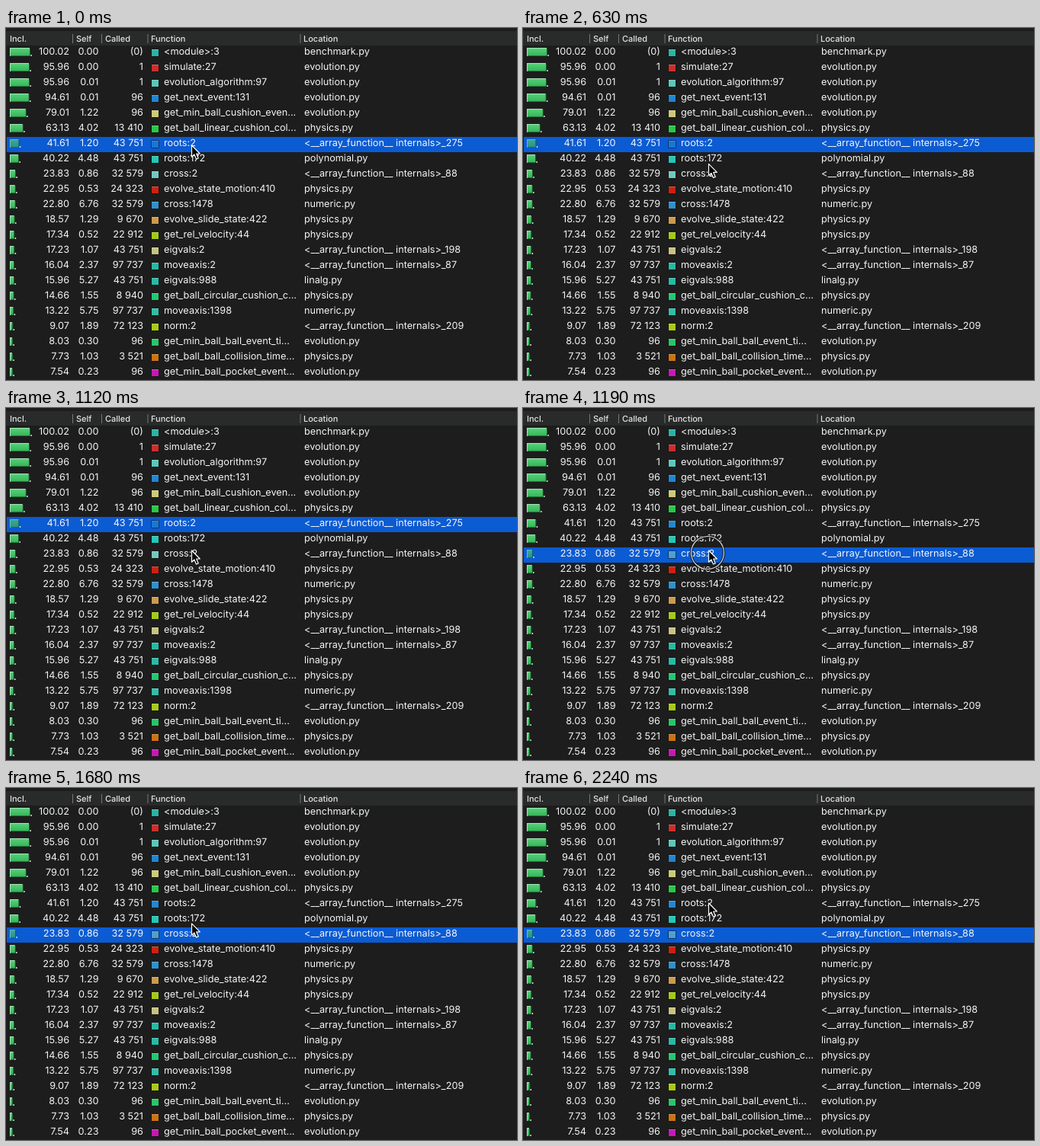
An HTML page for the animation above (2.45 s loop, 670 px wide and 462 px high).

```html
<!DOCTYPE html>
<html lang="en">
<head>
<meta charset="utf-8">
<title>Profiler call list</title>
<style>
  html, body { margin: 0; width: 100%; height: 100%; overflow: hidden; background: #1d1d1d; }
  svg { display: block; width: 670px; height: 462px; }
  text { font: 12.7px Inter, "Open Sans", sans-serif; fill: #f4f4f4; text-rendering: geometricPrecision; }
  .head { font-size: 11px; font-weight: 500; fill: #e4e4e4; }
  .num { text-anchor: end; }
  .tint { fill: #0b5bd3; opacity: 0; }
  .selected .back { fill: #0b5bd3; }
  .selected .tint { opacity: .35; }
</style>
</head>
<body>
<svg id="stage" viewBox="0 0 670 462">
  <defs>
    <linearGradient id="green" x2="0" y2="1">
      <stop offset="0" stop-color="#55cf78"/>
      <stop offset="1" stop-color="#35b358"/>
    </linearGradient>
  </defs>
  <rect width="670" height="462" fill="#1d1d1d"/>
  <rect y="4" width="670" height="19" fill="#292a2a"/>
  <g id="header"></g>
  <g id="rows"></g>
  <g id="ring" fill="none">
    <circle cx="242" cy="190" r="21.5" stroke="#111" stroke-opacity=".75" stroke-width="3.4"/>
    <circle cx="242" cy="190" r="21.5" stroke="#d8d8d8" stroke-width="1.2"/>
  </g>
  <path id="cursor" d="M0 0V15.2L3.4 12L6 18L8.7 16.9L6.2 11H10.8Z"
        fill="#000" stroke="#fff" stroke-width="1.2" stroke-linejoin="round"/>
</svg>
<script>
const LOOP = 2450, STEP = 70, CLICK = 1190, RELEASE = 1330;
const FIRST_PICK = 6, SECOND_PICK = 8;

// inclusive | self | calls | function | location | swatch
const calls = `100.02|0.00|(0)|<module>:3|benchmark.py|#2bb3a4
95.96|0.00|1|simulate:27|evolution.py|#cf2c2c
95.96|0.01|1|evolution_algorithm:97|evolution.py|#5ac8bb
94.61|0.01|96|get_next_event:131|evolution.py|#2085d2
79.01|1.22|96|get_min_ball_cushion_even...|evolution.py|#cbca78
63.13|4.02|13 410|get_ball_linear_cushion_col...|physics.py|#28c846
41.61|1.20|43 751|roots:2|<__array_function__ internals>_275|#2387d0
40.22|4.48|43 751|roots:172|polynomial.py|#22c8b7
23.83|0.86|32 579|cross:2|<__array_function__ internals>_88|#74c8bf
22.95|0.53|24 323|evolve_state_motion:410|physics.py|#cf2010
22.80|6.76|32 579|cross:1478|numeric.py|#3090ce
18.57|1.29|9 670|evolve_slide_state:422|physics.py|#cc9a4e
17.34|0.52|22 912|get_rel_velocity:44|physics.py|#a3cb12
17.23|1.07|43 751|eigvals:2|<__array_function__ internals>_198|#c9c281
16.04|2.37|97 737|moveaxis:2|<__array_function__ internals>_87|#28b8a4
15.96|5.27|43 751|eigvals:988|linalg.py|#28b9a6
14.66|1.55|8 940|get_ball_circular_cushion_c...|physics.py|#24c771
13.22|5.75|97 737|moveaxis:1398|numeric.py|#31bda8
9.07|1.89|72 123|norm:2|<__array_function__ internals>_209|#a8ca12
8.03|0.30|96|get_min_ball_ball_event_ti...|evolution.py|#28c668
7.73|1.03|3 521|get_ball_collision_time...|physics.py|#cc7212
7.54|0.23|96|get_min_ball_pocket_event...|evolution.py|#c818b4`
  .replace("get_ball_collision", "get_ball_ball_collision")
  .split("\n").map(line => line.split("|"));

const $ = id => document.getElementById(id);

function add(parent, tag, attrs, label) {
  const node = document.createElementNS("http://www.w3.org/2000/svg", tag);
  for (const key in attrs) node.setAttribute(key, attrs[key]);
  if (label) node.textContent = label;
  return parent.appendChild(node);
}

const box = (parent, x, y, width, height, fill, extra) =>
  add(parent, "rect", { x, y, width, height, fill, ...extra });

[["Incl.", 5], ["Self", 92], ["Called", 130], ["Function", 190], ["Location", 390]]
  .forEach(([label, x], i) => {
    add($("header"), "text", { x, y: 18, class: "head" }, label);
    if (i) box($("header"), x - (i < 3 ? 5 : 4.5), 8, 1, 12, "#777");
  });

function addBar(row, share, mid) {
  const width = Math.max(2, share * .25), top = mid - 5;
  box(row, 5, top, width + 1, 11, "#a5e5b6");
  box(row, 6, top + 1, width, 10, "url(#green)");
  box(row, 6, top + 10, width, 1, "#1c7a37");
  box(row, 6 + width, top + 1, 1, 10, "#17642d");
  box(row, 7.4 + width, top + 9, 1.4, 2, "#d6f0dc");
}

const rows = calls.map(([incl, self, count, name, place, color], i) => {
  const row = add($("rows"), "g", {}), mid = 31 + 20 * i, y = mid + 4.4;
  box(row, 1, mid - 8, 669, 20, "none", { class: "back" });
  addBar(row, +incl, mid);
  box(row, 190.5, mid - 3.5, 10, 10, "#111");
  box(row, 191, mid - 3, 9, 9, color);
  box(row, 191, mid - 3, 9, 1, "#fff", { opacity: .25 });
  box(row, 5, mid - 5, Math.max(4, incl * .25 + 2), 11, "", { class: "tint" });
  box(row, 191, mid - 3, 9, 9, "", { class: "tint" });
  [[incl, 83], [self, 121.5], [count, 180]].forEach(([label, x]) =>
    add(row, "text", { x, y, class: "num" }, label));
  add(row, "text", { x: 207, y }, name);
  add(row, "text", { x: 391, y }, place);
  return row;
});

function ease(t, start, end) {
  const p = Math.min(1, Math.max(0, (t - start) / (end - start)));
  return p * p * (3 - 2 * p);
}

const cursorY = t =>
  154 + 33 * ease(t, 210, 840) - 35 * ease(t, 1470, 2100) - ease(t, 2030, 2240);

function draw(now) {
  const t = Math.floor(now % LOOP / STEP) * STEP;
  const clicked = t >= CLICK;
  rows[FIRST_PICK].classList.toggle("selected", !clicked);
  rows[SECOND_PICK].classList.toggle("selected", clicked);
  $("ring").style.display = clicked && t < RELEASE ? "" : "none";
  $("cursor").setAttribute("transform", `translate(243.5 ${cursorY(t)})`);
}

const begin = performance.now();
function tick() {
  draw(performance.now() - begin);
  requestAnimationFrame(tick);
}
tick();
</script>
</body>
</html>
```
